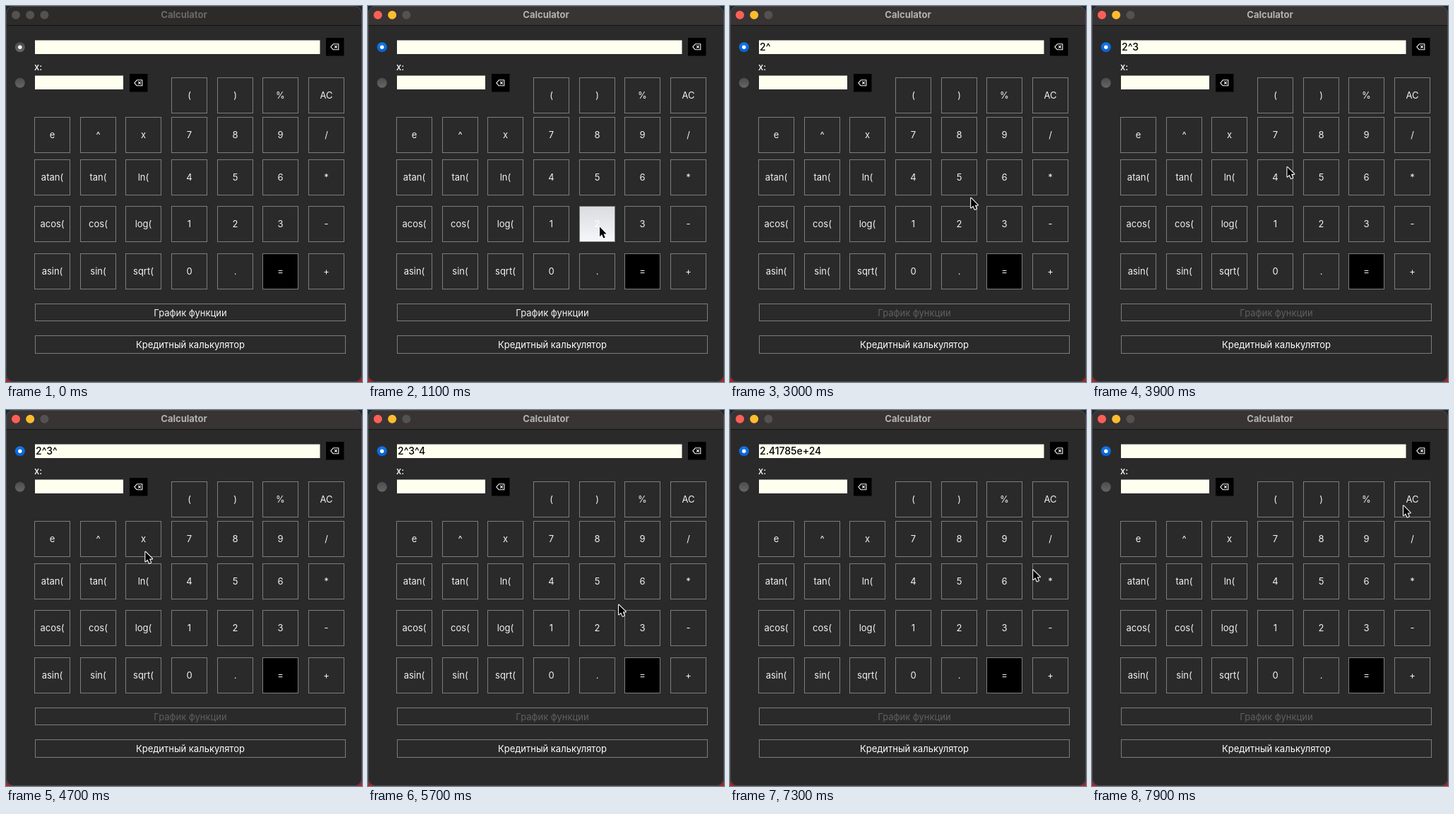
Recreate the animation shown at these times as an HTML page with a canvas. Size 504 px wide and 532 px high, loop 8 s.

```html
<!DOCTYPE html>
<html lang="ru">
<head>
<meta charset="utf-8">
<title>Calculator</title>
<style>
html, body { margin: 0; width: 504px; height: 532px; overflow: hidden; background: #2a2a2a; }
canvas { display: block; }
</style>
</head>
<body>
<canvas id="stage" width="504" height="532"></canvas>
<script>
const ctx = document.getElementById('stage').getContext('2d');
const LOOP = 8000, STEP = 100, TAP = 80;
const BG = '#2a2a2a', BORDER = '#7d7d7d', CREAM = '#fffff0';
const FONT = 'Inter, "Open Sans", sans-serif';
const SIDE = 50;

// Keys sit in seven even columns; short rows are aligned to the right.
const ROW_TOPS = [101, 157, 217, 283, 350];
const ROW_KEYS = [
  '( ) % AC',
  'e ^ x 7 8 9 /',
  'atan( tan( ln( 4 5 6 *',
  'acos( cos( log( 1 2 3 -',
  'asin( sin( sqrt( 0 . = +'
];
const KEYS = new Map();
ROW_KEYS.forEach((line, row) => {
  const labels = line.split(' ');
  labels.forEach((label, i) => {
    const column = 7 - labels.length + i;
    KEYS.set(label, { x: Math.round(40 + column * 194 / 3), y: ROW_TOPS[row] });
  });
});

// Each visit: pointer leaves, arrives, taps; the entry then reads "shows".
const VISITS = [
  { key: '2', leave: 100, arrive: 1000, tap: 1100, shows: '2', bend: 0 },
  { key: '^', leave: 1500, arrive: 2600, tap: 2610, shows: '2^', bend: 1.4 },
  { key: '3', leave: 2650, arrive: 3170, tap: 3310, shows: '2^3', grip: [-12, 10] },
  { key: '^', leave: 3500, arrive: 4250, tap: 4300, shows: '2^3^' },
  { key: '4', leave: 4400, arrive: 5135, tap: 5200, shows: '2^3^4' },
  { key: '=', leave: 5350, arrive: 6130, tap: 6500, shows: '2.41785e+24', bend: 0.85, grip: [20, 6] },
  { key: 'AC', leave: 6800, arrive: 7650, tap: 7700, shows: '', bend: 0, grip: [-13, 9] }
];

let last = [142, 381];
for (const visit of VISITS) {
  const { x, y } = KEYS.get(visit.key);
  const [dx, dy] = visit.grip || [3, 4];
  visit.from = last;
  visit.to = last = [x + SIDE / 2 + dx, y + SIDE / 2 + dy];
}

function text(str, x, y, { color = '#f2f2f2', weight = 400, size = 13, align = 'center' } = {}) {
  ctx.font = `${weight} ${size}px ${FONT}`;
  ctx.textAlign = align;
  ctx.fillStyle = color;
  ctx.fillText(str, x, y);
}

function rect(x, y, w, h, color) {
  ctx.fillStyle = color;
  ctx.fillRect(x, y, w, h);
}

function disc(x, y, r, color) {
  ctx.fillStyle = color;
  ctx.beginPath();
  ctx.arc(x, y, r, 0, Math.PI * 2);
  ctx.fill();
}

function frame(x, y, w, h) {
  ctx.strokeStyle = BORDER;
  ctx.lineWidth = 1;
  ctx.strokeRect(x + 0.5, y + 0.5, w, h);
}

function vertical(y0, y1, from, to) {
  const g = ctx.createLinearGradient(0, y0, 0, y1);
  g.addColorStop(0, from);
  g.addColorStop(1, to);
  return g;
}

function drawWindow(active) {
  rect(0, 0, 504, 266, '#15283a');
  rect(0, 266, 504, 266, '#a5262b');
  ctx.beginPath();
  ctx.roundRect(0, 0, 504, 532, 10);
  ctx.fillStyle = BG;
  ctx.fill();
  ctx.save();
  ctx.clip();
  rect(0, 0, 504, 27, active ? '#383434' : '#2d2a2a');
  rect(0, 27, 504, 1, '#131313');
  ctx.restore();
  ctx.strokeStyle = '#4c4a4a';
  ctx.lineWidth = 1;
  ctx.beginPath();
  ctx.roundRect(0.5, 0.5, 503, 531, 10);
  ctx.stroke();
  ['#fe5f57', '#febc2e', '#545151'].forEach((color, i) =>
    disc(14 + i * 20.2, 12.8, 6, active ? color : '#545151'));
  text('Calculator', 252, 17, { color: active ? '#b4b1b1' : '#6c6969', weight: 700 });
}

function drawRadio(y, checked, active) {
  const [top, bottom] = checked && active ? ['#1477e8', '#0560d4'] : ['#4c4c4c', '#666666'];
  disc(19.8, y, 7, vertical(y - 7, y + 7, top, bottom));
  if (checked) disc(19.8, y, 2.7, '#fff');
}

function drawField(x, y, w) {
  rect(x, y, w, 19.5, CREAM);
}

function drawErase(x, y) {
  rect(x, y, 25.5, 25.5, '#000');
  ctx.save();
  ctx.translate(x + 12.8, y + 12.8);
  ctx.strokeStyle = '#f4f4f4';
  ctx.lineWidth = 1.1;
  ctx.lineJoin = 'round';
  ctx.stroke(new Path2D('M-6 0L-2.5 -4H5V4H-2.5ZM-.6 -1.8L3 1.8M3 -1.8L-.6 1.8'));
  ctx.restore();
}

function drawKeys(pressed) {
  for (const [label, { x, y }] of KEYS) {
    if (label === pressed) rect(x, y, SIDE + 1, SIDE + 1, vertical(y, y + SIDE, '#dadbde', '#f6f7fa'));
    else if (label === '=') rect(x, y, SIDE + 1, SIDE + 1, '#000');
    frame(x, y, SIDE, SIDE);
    text(label, x + 25.5, y + 30, { color: label === pressed ? '#fff' : '#f2f2f2' });
  }
}

function drawPointer([x, y]) {
  const arrow = new Path2D('M0 0V14L3.2 11L5.6 16.4L8 15.4L5.7 10.1H10Z');
  ctx.save();
  ctx.translate(x + 1, y + 0.6);
  ctx.scale(0.97, 0.97);
  ctx.lineJoin = 'round';
  ctx.lineWidth = 2.2;
  ctx.strokeStyle = '#fff';
  ctx.stroke(arrow);
  ctx.fillStyle = '#000';
  ctx.fill(arrow);
  ctx.restore();
}

// Eased arc whose control point leans toward the corner above the lower end.
function pointerAt(t) {
  const { from, to, leave, arrive, bend = 0.55 } = VISITS.findLast(v => v.leave <= t);
  const u = Math.min(1, (t - leave) / (arrive - leave));
  const s = u * u * (3 - 2 * u);
  const corner = from[1] > to[1] ? [from[0], to[1]] : [to[0], from[1]];
  return from.map((a, i) => {
    const b = to[i], mid = (a + b) / 2;
    const control = mid + bend * (corner[i] - mid);
    return a * (1 - s) ** 2 + 2 * control * s * (1 - s) + b * s * s;
  });
}

function draw(t) {
  const active = t >= VISITS[0].tap;
  const pressed = VISITS.find(v => t >= v.tap && t < v.tap + TAP);
  const done = VISITS.findLast(v => t >= v.tap + TAP);

  drawWindow(active);
  drawRadio(58.2, true, active);
  drawRadio(108.8, false, active);
  drawField(41, 48.5, 403.5);
  drawField(41, 98.5, 125);
  text(done ? done.shows : '', 42, 63, { color: '#000', weight: 500, size: 14, align: 'left' });
  text('x:', 40, 91, { color: '#fff', weight: 500, align: 'left' });
  drawErase(453, 45);
  drawErase(175, 96);
  drawKeys(pressed && pressed.key);

  frame(41, 421, 439, 24);
  frame(41, 466, 439, 25);
  text('График функции', 261, 438.5, { color: done ? '#5f5f5f' : '#f2f2f2' });
  text('Кредитный калькулятор', 261, 484, { color: '#fff' });

  if (t >= VISITS[0].leave) drawPointer(pointerAt(t));
}

const begin = performance.now();
function tick() {
  const t = (performance.now() - begin) % LOOP;
  draw(Math.floor(t / STEP) * STEP);
  requestAnimationFrame(tick);
}
tick();
</script>
</body>
</html>
```
